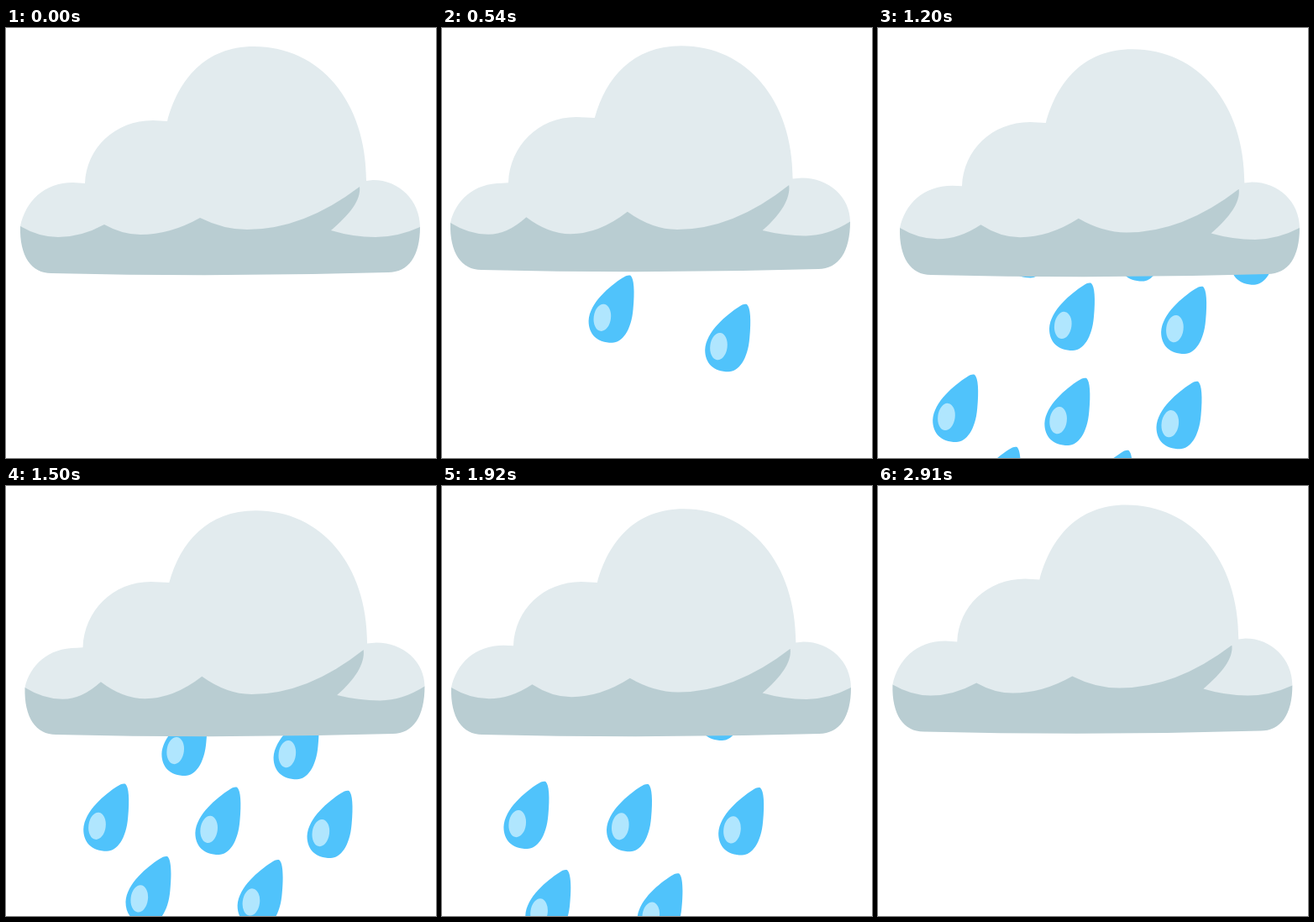
Recreate the animation shown at these times as an HTML page with a canvas. Size 512 px wide and 512 px high, loop 2940 ms.

```html
<!DOCTYPE html>
<html lang="en">
<head>
<meta charset="utf-8">
<title>Rain cloud</title>
<style>
  html, body { margin: 0; width: 100%; height: 100%; overflow: hidden; background: #fff; }
  canvas { display: block; width: 100vmin; height: 100vmin; }
</style>
</head>
<body>
<canvas id="stage" width="512" height="512"></canvas>
<script>
const ctx = document.getElementById('stage').getContext('2d');
const LOOP = 2940, STEP = 30;
const LIGHT = '#e2ebee', SHADE = '#b9cdd2', WATER = '#50c3fb', SHINE = '#b0e6fe';

// Key poses of the whole cloud: time, shift x, shift y, wobble
const POSES = [
  [0, 0, 0, 0], [270, -4.6, -8, 3], [540, -7, -4, 8], [1200, 9, 2, 3], [1500, 5.5, 4, 8],
  [1920, -6, 4, 3], [2160, -1, 2, 4], [2400, 5.5, 5, 6], [LOOP, 0, 0, 0]
];

// Points of the cloud: x, y, and how far the wobble moves each in x and y
const POINTS = {
  edgeL: [17, 236, 0, 0],       topL: [80, 184, -0.15, 0.6],
  joinL: [94, 185, -1, 0.4],    topM: [175, 110, -1, 0],
  joinM: [192, 111, -0.4, 0],   topBig: [295, 22, -0.4, 0.4],
  joinR: [429, 182, -0.55, 0.2], topR: [437, 181, -0.2, 0.2],
  edgeR: [493, 237, 0, -0.3],   bellyR: [440, 249, 0, 0.3],
  notch: [387, 241, 0.2, 0.5],  tip: [421, 189, -0.1, 0.25],
  bellyBig: [287, 240, 0, 0.5], cuspR: [231, 226, -0.4, -0.4],
  bellyM: [160, 246, 0, 0.4],   cuspL: [117, 234, -1.2, -0.6],
  bellyL: [62, 249, 0, 0.1],    floorL: [54, 292, 0, 0],
  floorR: [455, 291, 0, 0]
};

// Smooth cyclic curve through one column of the poses
function track(col, t) {
  const n = POSES.length - 1;
  const k = POSES.findIndex(p => p[0] > t) - 1;
  const key = i => {
    const turn = Math.floor(i / n), p = POSES[i - turn * n];
    return [p[0] + turn * LOOP, p[col]];
  };
  const [a, b, c, d] = [k - 1, k, k + 1, k + 2].map(key);
  const span = c[0] - b[0], u = (t - b[0]) / span, rise = c[1] - b[1];
  const m0 = (c[1] - a[1]) / (c[0] - a[0]) * span;
  const m1 = (d[1] - b[1]) / (d[0] - b[0]) * span;
  return b[1] + u * (m0 + u * (3 * rise - 2 * m0 - m1 + u * (m0 + m1 - 2 * rise)));
}

// Pen helpers: each draws from a to b
const mix = (a, b, k) => a + (b - a) * k;
const line = (a, b) => ctx.lineTo(b.x, b.y);
const rise = (a, b, lean = 0, k = 0.56) => ctx.bezierCurveTo(
  mix(a.x, b.x, lean), mix(a.y, b.y, k), mix(b.x, a.x, k), b.y, b.x, b.y);
const fall = (a, b, k = 0.56) => ctx.bezierCurveTo(
  mix(a.x, b.x, k), a.y, b.x, mix(b.y, a.y, k), b.x, b.y);
const sag = (a, b, y) => ctx.quadraticCurveTo((a.x + b.x) / 2, y, b.x, b.y);
const hang = (a, low, b) => { sag(a, low, low.y); sag(low, b, low.y); };

function fill(color, start, draw) {
  ctx.beginPath();
  ctx.moveTo(start.x, start.y);
  draw();
  ctx.fillStyle = color;
  ctx.fill();
}

function drawCloud(t) {
  const [dx, dy, wobble] = [1, 2, 3].map(col => track(col, t));
  const p = {};
  for (const [name, [x, y, gx, gy]] of Object.entries(POINTS))
    p[name] = { x: x + dx + gx * wobble, y: y + dy + gy * wobble };

  const puff = t < 540 ? 1 + 0.031 * Math.sin(Math.PI * t / 540) ** 2 : 1;
  ctx.save();
  ctx.translate(255, 158);
  ctx.scale(puff, puff);
  ctx.translate(-255, -158);
  fill(SHADE, p.edgeL, () => {
    rise(p.edgeL, p.floorL, -0.03, 0.64);
    sag(p.floorL, p.floorR, p.floorL.y + 5);
    fall(p.floorR, p.edgeR, 0.64);
    line(p.edgeR, p.tip);
  });
  fill(LIGHT, p.edgeL, () => {
    rise(p.edgeL, p.topL, 0.1);
    line(p.topL, p.joinL);
    rise(p.joinL, p.topM, 0.02);
    line(p.topM, p.joinM);
    rise(p.joinM, p.topBig, 0.13);
    fall(p.topBig, p.joinR, 0.59);
    line(p.joinR, p.topR);
    fall(p.topR, p.edgeR);
    hang(p.edgeR, p.bellyR, p.notch);
    ctx.bezierCurveTo(p.notch.x + 22, p.notch.y - 19, p.tip.x + 2, p.tip.y + 16, p.tip.x, p.tip.y);
    hang(p.tip, p.bellyBig, p.cuspR);
    hang(p.cuspR, p.bellyM, p.cuspL);
    hang(p.cuspL, p.bellyL, p.edgeL);
  });
  ctx.restore();
}

// Rows of drops: time and x at which the first tip passes y = 200, drop count.
// The last drop falls more steeply.
const ROWS = [
  [258, 419, 1], [333, 265, 1], [547, 297.5, 2], [735, 208.5, 3], [973, 298.5, 2],
  [1162, 209.5, 3], [1358, 262.5, 2], [1588, 189.5, 1], [1581, 313.5, 2],
  [1874, 361.5, 1, 0.498, -0.167]
];
const body = new Path2D('M2 0C6 4 7 18 5 40C3 65-8 80-20 80C-38 80-48 70-48 54C-47 32-22 12-8 3C-4 0 0-1 2 0Z');

function drawDrop(x, y) {
  ctx.save();
  ctx.translate(x, y);
  ctx.fillStyle = WATER;
  ctx.fill(body);
  ctx.fillStyle = SHINE;
  ctx.beginPath();
  ctx.ellipse(-31.7, 50, 10.2, 16.2, 0.13, 0, 7);
  ctx.fill();
  ctx.restore();
}

function drawRain(t) {
  ctx.save();
  ctx.beginPath();
  ctx.rect(0, 272, 512, 240);
  ctx.clip();
  for (const [start, x, count, speed = 0.458, drift = -0.205] of ROWS)
    for (let i = 0; i < count; i++) {
      const age = t - start + 9 * i;
      if (age > 0) drawDrop(x + 135 * i + drift * age, 200 + speed * age);
    }
  ctx.restore();
}

function frame(now) {
  const t = Math.floor(now % LOOP / STEP) * STEP;
  ctx.clearRect(0, 0, 512, 512);
  drawRain(t);
  drawCloud(t);
  requestAnimationFrame(frame);
}
requestAnimationFrame(frame);
</script>
</body>
</html>
```
